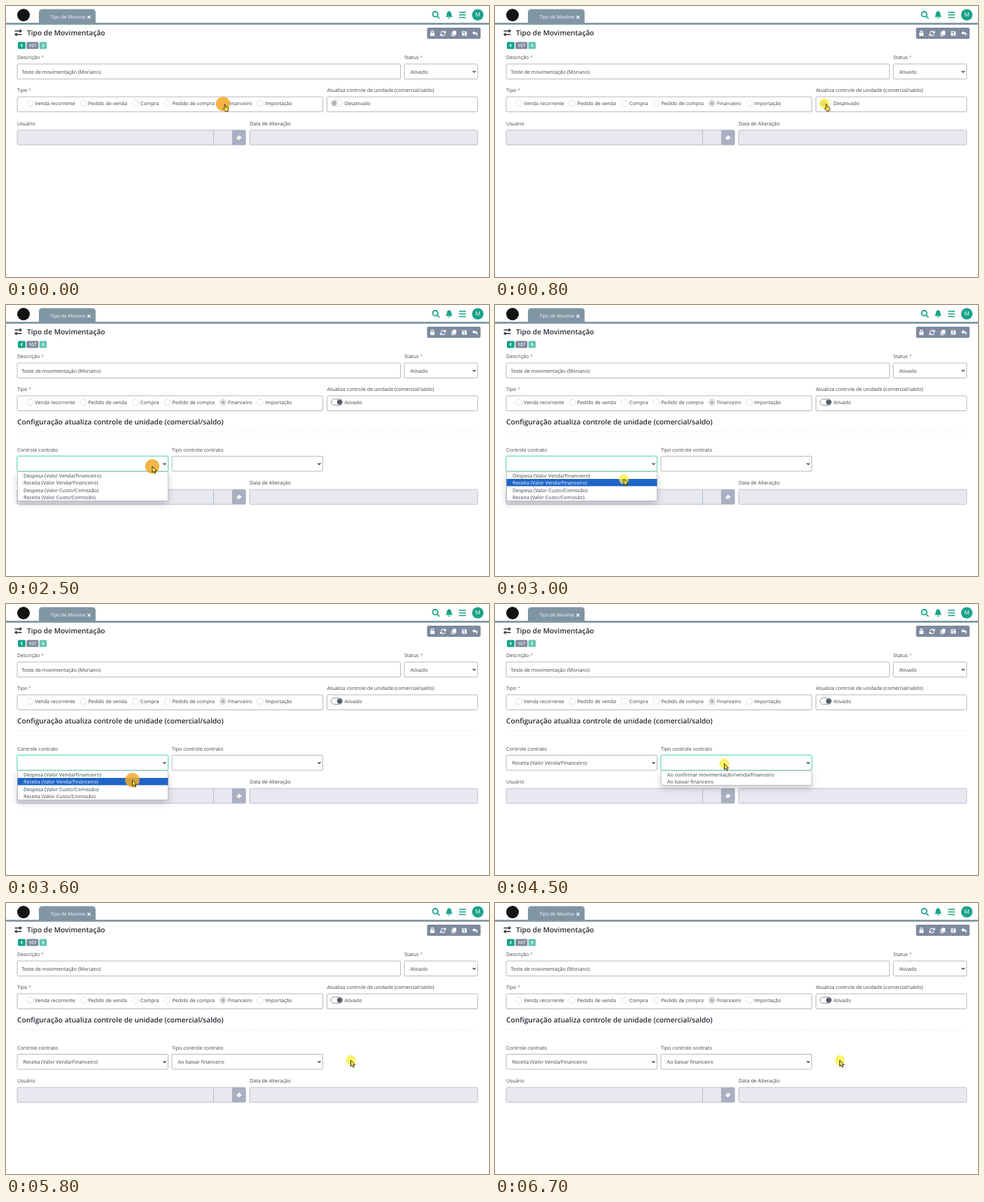
Recreate the animation shown at these times as an HTML page. Size 690 by 388 pixels, loop 6.8 s.

```html
<!DOCTYPE html>
<html lang="pt-BR">
<head>
<meta charset="utf-8">
<title>Tipo de Movimentação</title>
<style>
html, body { margin: 0; width: 100%; height: 100%; overflow: hidden; background: #fff; }
svg { display: block; width: 100%; height: 100%; }
text { font: 7.12px "Open Sans", "Noto Sans", sans-serif; fill: #3b4047; text-rendering: geometricPrecision; }
.title { font-size: 10.2px; font-weight: 600; fill: #262b33; }
.star { fill: #8790a5; }
.light { fill: #fff; }
.box { fill: #fff; stroke: #aeb0b4; stroke-width: .9; }
.off { fill: #e8e9f0; stroke: #b7bbc7; }
.focus { stroke: #62d8bd; filter: drop-shadow(0 0 1px #7fe0ca); }
.line { fill: none; stroke: #30353c; stroke-width: 1.2; }
.white { fill: none; stroke: #fff; stroke-width: 1.1; }
.teal { fill: none; stroke: #1ba38a; stroke-width: 1.8; }
.menu { fill: #fff; stroke: #a4a8ae; stroke-width: .6; filter: drop-shadow(0 4px 5px #0003); }
</style>
</head>
<body>
<svg id="stage" viewBox="0 0 690 388" preserveAspectRatio="none"></svg>
<script>
const LOOP = 6800, STEP = 100, ROW = 10.4;
const stage = document.getElementById('stage');

// Text is placed by the vertical middle of its capitals.
const text = (x, y, s, extra = '') => `<text x="${x}" y="${y + 2.6}" ${extra}>${s}</text>`;
const label = (x, y, s, required) =>
  text(x, y, s + (required ? ' <tspan class="star">*</tspan>' : ''));
const rect = (x, y, w, h, extra = 'class="box"', r = 1.5) =>
  `<rect x="${x}" y="${y}" width="${w}" height="${h}" rx="${r}" ${extra}/>`;
const path = (d, cls, x = 0, y = 0, extra = '') =>
  `<path d="${d}" class="${cls}" transform="translate(${x} ${y})" ${extra}/>`;
const group = (id, body) => `<g id="${id}">${body}</g>`;

const select = (id, x, y, w, value) =>
  rect(x, y, w, 21.5, `id="${id}" class="box"`) +
  text(x + 8.5, y + 11, value, `id="${id}Value"`) +
  path('M-2-1L0 1 2-1', 'line', x + w - 5, y + 11);

const radio = (x, name) =>
  `<circle cx="${x}" cy="139.3" r="4.4" fill="#fff" stroke="#d8dadd" stroke-width=".8"/>` +
  text(x + 7, 139.3, name);

const menu = (id, x, options) => group(id,
  rect(x, 238.8, 215, options.length * ROW, 'class="menu"', 0) +
  rect(x, 249, 215, ROW, `id="${id}Mark" fill="#1f64c8"`, 0) +
  options.map((s, i) => text(x + 8.5, 244.2 + i * ROW, s, `id="${id}Item${i}"`)).join(''));

const swapArrows = 'M0 2H9M7 0L9.5 2 7 4M10 7H1M3 5L.5 7 3 9';

const header =
  rect(0, 24, 690, 2.8, 'fill="#8099a3"', 0) +
  '<circle cx="25" cy="13" r="9" fill="#141414"/>' +
  '<path d="M47 25V9.5Q47 4.5 52 4.5H123Q128 4.5 128 9.5V25Z" fill="#8096a3"/>' +
  path(swapArrows, 'white', 54.5, 11.8, 'style="scale:.72;transform-box:fill-box"') +
  '<clipPath id="tabClip"><rect x="60" y="5" width="53.5" height="20"/></clipPath>' +
  `<g clip-path="url(#tabClip)">${text(63.5, 15.2, 'Tipo de Movimentação', 'class="light" style="font-size:6.7px"')}</g>` +
  path('M-2-2L2 2M2-2L-2 2', 'white', 118.5, 16, 'stroke-width="1.5"') +
  '<circle cx="613.2" cy="11.7" r="3.7" class="teal"/>' + path('M616 14.5L619.3 18', 'teal') +
  '<path d="M628 15.8Q629.7 14 629.7 11.2 629.8 8.3 632.3 7.8V7H633.7V7.8Q636.2 8.3 636.3 11.2 636.3 14 638 15.8ZM631.5 16.7H634.5Q634 18.2 633 18.2 632 18.2 631.5 16.7Z" fill="#1ba38a"/>' +
  path('M647.2 9H657M647.2 12.7H657M647.2 16.4H657', 'teal', 0, 0, 'style="stroke-width:1.5"') +
  '<circle cx="674" cy="12.6" r="8.2" fill="#1ba38a"/>' +
  text(674, 12.8, 'M', 'class="light" text-anchor="middle" style="font-size:8px"');

const toolbar =
  rect(601.5, 31, 76.5, 16, 'fill="#7d8a9f"', 2) +
  rect(606.2, 38.6, 6, 4.4, 'fill="#fff"', .6) +
  path('M607.5 39V37.5Q607.5 35.6 609.2 35.6 610.9 35.6 610.9 37.5V39', 'white') +
  path('M621.2 38.4Q624.2 34.2 627.3 37.7M628 35.5V38.4H625.3M627.6 40.4Q624.6 44.6 621.5 41M620.8 43.3V40.4H623.5', 'white') +
  rect(638.2, 35.4, 5, 6, 'fill="#fff"', .5) + path('M637 37.3V42.8H641.5', 'white') +
  '<path d="M651.5 36H656.8L658.2 37.4V42.6H651.5Z" fill="#fff"/>' +
  rect(652.6, 36.9, 3.4, 1.5, 'fill="#7d8a9f"', 0) + '<circle cx="654.8" cy="40.6" r="1" fill="#7d8a9f"/>' +
  '<path d="M666 38.5L669.2 35.7V37.4Q673.8 37.4 673.6 40.5 673.5 42.2 672 43.2 673.2 39.8 669.2 39.7V41.4Z" fill="#fff"/>';

const titleRow =
  path(swapArrows, 'line', 12.5, 33.8, 'style="stroke-width:1.4"') +
  text(30, 38.9, 'Tipo de Movimentação', 'class="title"') +
  rect(17, 51.5, 10.8, 10, 'fill="#12a489"') + path('M1-2L-1 0 1 2', 'white', 22.4, 56.5) +
  rect(29.3, 51.5, 17, 10, 'fill="#7d889d"') +
  text(37.8, 56.5, '107', 'class="light" text-anchor="middle" style="font-size:6.6px;font-weight:600"') +
  rect(47.7, 51.5, 10.6, 10, 'fill="#63c5b1"') + path('M-1-2L1 0-1 2', 'white', 53, 56.5);

const form =
  label(16, 73, 'Descrição', true) + rect(16, 83, 547.5, 21.5) +
  text(22.5, 94.2, 'Teste de movimentação (Moriano)') +
  label(569, 73, 'Status', true) + select('status', 569, 83, 104.8, 'Ativado') +
  label(16, 120.5, 'Tipo', true) + rect(16, 130, 436.7, 21.5) +
  radio(34.3, 'Venda recorrente') + radio(110.6, 'Pedido de venda') + radio(185, 'Compra') +
  radio(230.5, 'Pedido de compra') + radio(310, 'Financeiro') + radio(363.3, 'Importação') +
  '<g id="checked"><circle cx="310" cy="139.3" r="4.4" fill="#f4f4f5" stroke="#c6c8cb" stroke-width=".8"/><circle cx="310" cy="139.3" r="2.6" fill="#b3b5b9"/></g>' +
  label(458.5, 120.5, 'Atualiza controle de unidade (comercial/saldo)') + rect(458.5, 130, 215.3, 21.5) +
  rect(464.3, 134.7, 16.4, 8.8, 'id="track" fill="#fff" stroke-width=".9"', 4.4) +
  '<circle id="knob" cy="139.1" r="3.6"/>' + text(483.5, 139.3, '', 'id="switchText"');

const config = group('config',
  text(16, 168, 'Configuração atualiza controle de unidade (comercial/saldo)', 'class="title"') +
  '<path d="M16 181.7H674" stroke="#e9eaec" stroke-width=".8" stroke-dasharray="2 1"/>' +
  label(16, 207, 'Controle contrato') + select('contract', 16, 216.5, 215.5, '') +
  label(237, 207, 'Tipo controle contrato') + select('kind', 237, 216.5, 215.5, ''));

const audit = group('audit',
  label(16, 168, 'Usuário') + rect(16, 177.7, 326.3, 21.2, 'class="box off"') +
  path('M296.5 178V199', 'off') +
  rect(323, 177.7, 19.3, 21.2, 'fill="#aab0c1"') +
  '<path d="M329.2 188.8L332.8 185 336.6 188.2 333.8 191.4H331.4Z" fill="#fff"/><path d="M330.8 187L334.6 190.6" stroke="#aab0c1" stroke-width=".6"/>' +
  label(348, 168, 'Data de Alteração') + rect(348, 177.7, 325.8, 21.2, 'class="box off"'));

const pointer = group('pointer',
  '<circle id="halo"/>' +
  '<path id="arrow" d="M0 0V8.8L2 7 3.5 10.2 5 9.5 3.6 6.5H6.3Z" fill="#ffe95c" stroke="#29230a" stroke-width=".9"/>' +
  '<path id="hand" d="M2.2 1Q3.2 0 3.7 1.2V4.4L7 5.2Q8 5.6 7.7 7L7 10.8H3.2L.4 7.4Q.3 6.2 1.5 6.5L2.2 7.1Z" fill="#ffd94f" stroke="#4a3610" stroke-width=".9"/>');

stage.innerHTML = header + toolbar + titleRow + form + config + audit +
  menu('contractMenu', 16.5, ['Despesa (Valor Venda/Financeiro)', 'Receita (Valor Venda/Financeiro)',
    'Despesa (Valor Custo/Comissão)', 'Receita (Valor Custo/Comissão)']) +
  menu('kindMenu', 237.5, ['Ao confirmar movimentação/venda/financeiro', 'Ao baixar financeiro']) + pointer;

const $ = id => document.getElementById(id);
const show = (id, on) => $(id).setAttribute('visibility', on ? 'inherit' : 'hidden');
const set = (id, attrs) => Object.entries(attrs).forEach(([k, v]) => $(id).setAttribute(k, v));
const between = (t, a, b) => t >= a && t < b;
const ease = k => k * k * (3 - 2 * k);

// Pointer moves: start, end, destination x and y.
const moves = [
  [400, 800, 470.5, 139.5], [1850, 2350, 209, 231], [2650, 3100, 180.5, 252],
  [3650, 4000, 327.5, 228.5], [4800, 5100, 307, 255], [5400, 5800, 492.5, 225]
];
const presses = [[0, 500], [2500, 2700], [3500, 3700], [4100, 4400], [5300, 5400]];

function pointerAt(t) {
  let x = 310, y = 140;
  for (const [start, end, toX, toY] of moves) {
    const k = ease(Math.min(1, Math.max(0, (t - start) / (end - start))));
    x += (toX - x) * k;
    y += (toY - y) * k;
  }
  return [x, y];
}

function drawMenu(id, open, marked) {
  show(id, open);
  show(id + 'Mark', open && marked);
  $(id + 'Item1').setAttribute('class', marked ? 'light' : '');
}

function draw(t) {
  const on = t >= 1800;
  show('checked', t >= 500);
  show('config', on);
  set('audit', { transform: `translate(0 ${on ? 86.4 : 0})` });
  $('switchText').textContent = on ? 'Ativado' : 'Desativado';
  set('track', { stroke: t >= 1900 ? '#858a92' : '#d9dbde' });
  set('knob', { cx: !on ? 469 : t < 1900 ? 471.5 : 476.5, fill: t >= 1900 ? '#565b64' : '#b0b2b6' });

  set('contract', { class: between(t, 2500, 4100) ? 'box focus' : 'box' });
  set('kind', { class: between(t, 4100, 5700) ? 'box focus' : 'box' });
  $('contractValue').textContent = t >= 3700 ? 'Receita (Valor Venda/Financeiro)' : '';
  $('kindValue').textContent = t >= 5400 ? 'Ao baixar financeiro' : '';

  const [x, y] = pointerAt(t);
  drawMenu('contractMenu', between(t, 2500, 3700), y > 249);
  drawMenu('kindMenu', between(t, 4100, 5400), y > 249);

  const pressed = presses.some(([a, b]) => between(t, a, b));
  const hand = t < 1900;
  set('pointer', { transform: `translate(${x} ${y})` });
  set('halo', pressed
    ? { r: 10.3, fill: '#f3ab2c', 'fill-opacity': .88 }
    : { r: 7.2, fill: '#ffee32', 'fill-opacity': .72 });
  show('hand', hand);
  show('arrow', !hand);
}

function frame() {
  draw(Math.floor(performance.now() % LOOP / STEP) * STEP);
  requestAnimationFrame(frame);
}
frame();
</script>
</body>
</html>
```
